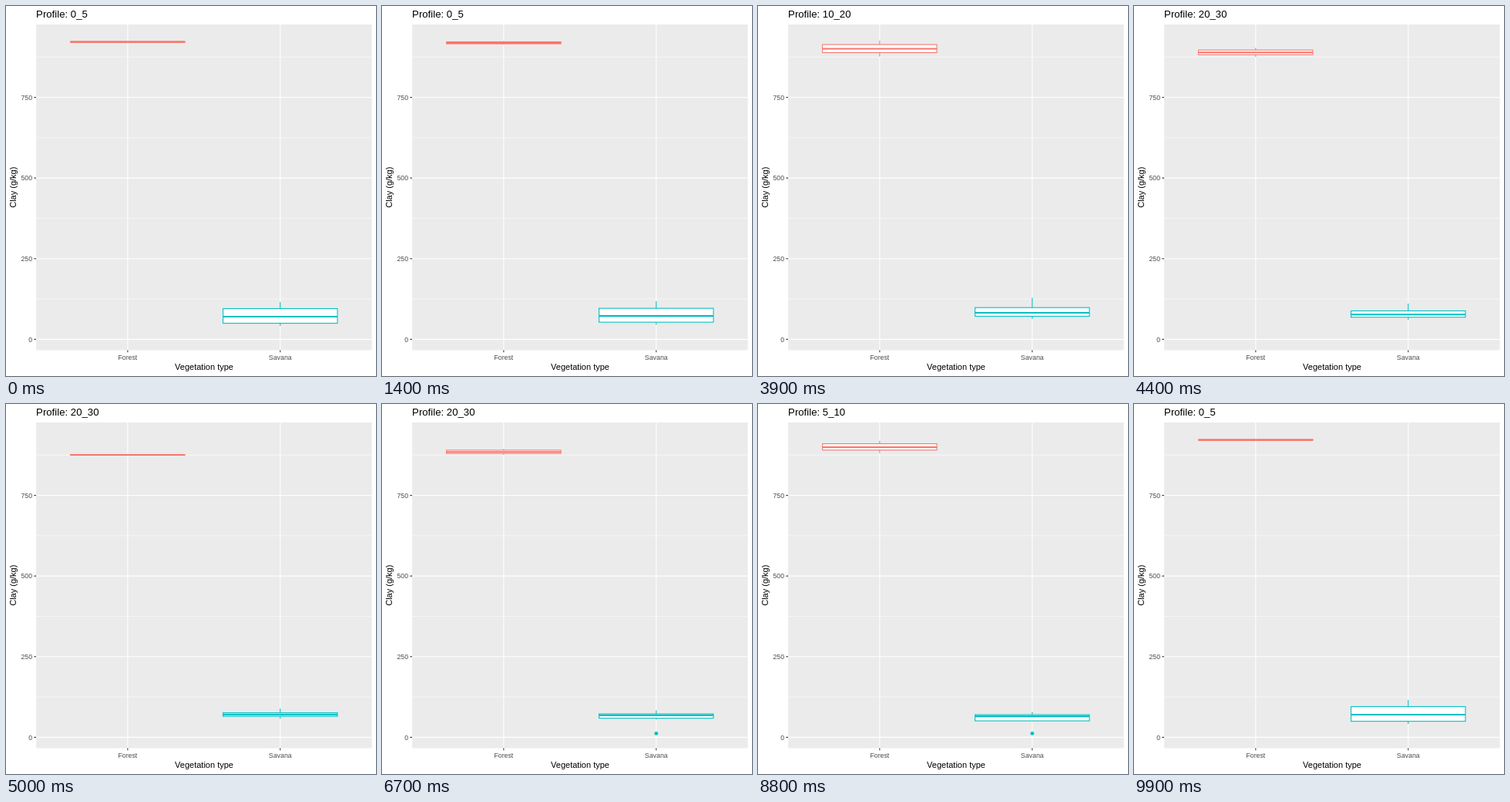
An HTML page that plays this animation: 480x480 px, repeating every 10 s.

```html
<!DOCTYPE html>
<html lang="en">
<head>
<meta charset="utf-8">
<title>Clay by vegetation type</title>
<style>
  html, body { margin: 0; width: 100%; height: 100%; overflow: hidden; background: #fff; }
  svg { display: block; width: 480px; height: 480px; font-family: "Liberation Sans", Arial, sans-serif; }
  .tick { font-size: 8.8px; fill: #4d4d4d; }
  .label { font-size: 11px; }
  .heading { font-size: 13.2px; }
</style>
</head>
<body>
<svg id="chart" viewBox="0 0 480 480"></svg>
<script>
const chart = document.getElementById("chart");
const PANEL = { left: 39.1, top: 24, right: 474.5, bottom: 446.5 };
const ZERO = 432.4, PER_UNIT = 0.4185;
const BOX_WIDTH = 148.4, LINE = 1.07;
const GROUPS = [
  { name: "Forest", x: 157.85, color: "#F8766D" },
  { name: "Savana", x: 355.75, color: "#00BFC4" }
];

// Pixel heights per group: whisker top, box top, median, box bottom, whisker bottom
const STATES = [
  { title: "0_5",   boxes: [[46.1, 46.1, 46.6, 47.1, 47.1], [384, 392.5, 403, 411.6, 415]] },
  { title: "10_20", boxes: [[43, 48.6, 54.6, 60, 65.5], [377, 390.4, 397.6, 402.3, 405.8]] },
  { title: "20_30", boxes: [[65.6, 65.6, 66, 66.4, 66.4], [395, 400.6, 402.9, 405.2, 408.2]] },
  { title: "5_10",  boxes: [[48, 52, 56.9, 60.9, 65.2], [401, 404, 405.3, 411, 411]] }
];
// Each leg moves from state i to the next one, in steps of 100 ms
const LEGS = [[12, 25], [38, 50], [62, 74], [87, 99]];
const STEP = 100, STEPS = 100;

function add(tag, attrs, text) {
  const el = document.createElementNS("http://www.w3.org/2000/svg", tag);
  set(el, attrs);
  if (text) el.textContent = text;
  return chart.appendChild(el);
}
function set(el, attrs) {
  for (const key in attrs) el.setAttribute(key, attrs[key]);
}
function line(x1, y1, x2, y2, stroke, width) {
  return add("line", { x1, y1, x2, y2, stroke, "stroke-width": width });
}
function label(cls, x, y, anchor, text) {
  return add("text", { class: cls, x, y, "text-anchor": anchor }, text);
}

function drawFrame() {
  const { left, top, right, bottom } = PANEL;
  add("rect", { x: left, y: top, width: right - left, height: bottom - top, fill: "#EBEBEB" });
  const height = value => ZERO - value * PER_UNIT;
  for (let v = 125; v < 1000; v += 250) line(left, height(v), right, height(v), "#fff", LINE / 2);
  for (let v = 0; v < 1000; v += 250) {
    const y = height(v);
    line(left, y, right, y, "#fff", LINE);
    line(left - 2.75, y, left, y, "#333", LINE);
    label("tick", 34.1, y + 3.2, "end", String(v));
  }
  for (const g of GROUPS) {
    line(g.x, top, g.x, bottom, "#fff", LINE);
    line(g.x, bottom, g.x, bottom + 2.75, "#333", LINE);
    label("tick", g.x, 459, "middle", g.name);
  }
  label("label", 257, 472, "middle", "Vegetation type");
  set(label("label", 0, 0, "middle", "Clay (g/kg)"), { transform: "translate(13 235.2) rotate(-90)" });
}

function makeBox({ x, color }) {
  const half = BOX_WIDTH / 2;
  const upper = line(x, 0, x, 0, color, LINE);
  const lower = line(x, 0, x, 0, color, LINE);
  const body = add("rect", { x: x - half, width: BOX_WIDTH, fill: "#fff", stroke: color, "stroke-width": LINE });
  const median = line(x - half, 0, x + half, 0, color, LINE * 2);
  return ([high, top, mid, bottom, low]) => {
    set(upper, { y1: high, y2: top });
    set(lower, { y1: bottom, y2: low });
    set(body, { y: top, height: bottom - top });
    set(median, { y1: mid, y2: mid });
  };
}

drawFrame();
const heading = label("heading", 39.1, 15, "start", "");
const outlier = add("circle", { cx: GROUPS[1].x, cy: 427.4, r: 2.4, fill: GROUPS[1].color });
const boxes = GROUPS.map(makeBox);

function render(step) {
  let i = LEGS.findIndex(([, end]) => step < end);
  if (i < 0) i = 0;
  const [start, end] = LEGS[i];
  const p = step >= end ? 0 : Math.max(0, (step - start) / (end - start));
  const from = STATES[i], to = STATES[(i + 1) % STATES.length];
  boxes.forEach((update, g) =>
    update(from.boxes[g].map((y, k) => y + (to.boxes[g][k] - y) * p)));
  heading.textContent = "Profile: " + (p < 0.5 ? from : to).title;
  const shown = step > LEGS[2][0] && step < LEGS[3][1];
  outlier.setAttribute("visibility", shown ? "visible" : "hidden");
}

function tick() {
  render(Math.floor(performance.now() / STEP) % STEPS);
  requestAnimationFrame(tick);
}
tick();
</script>
</body>
</html>
```
